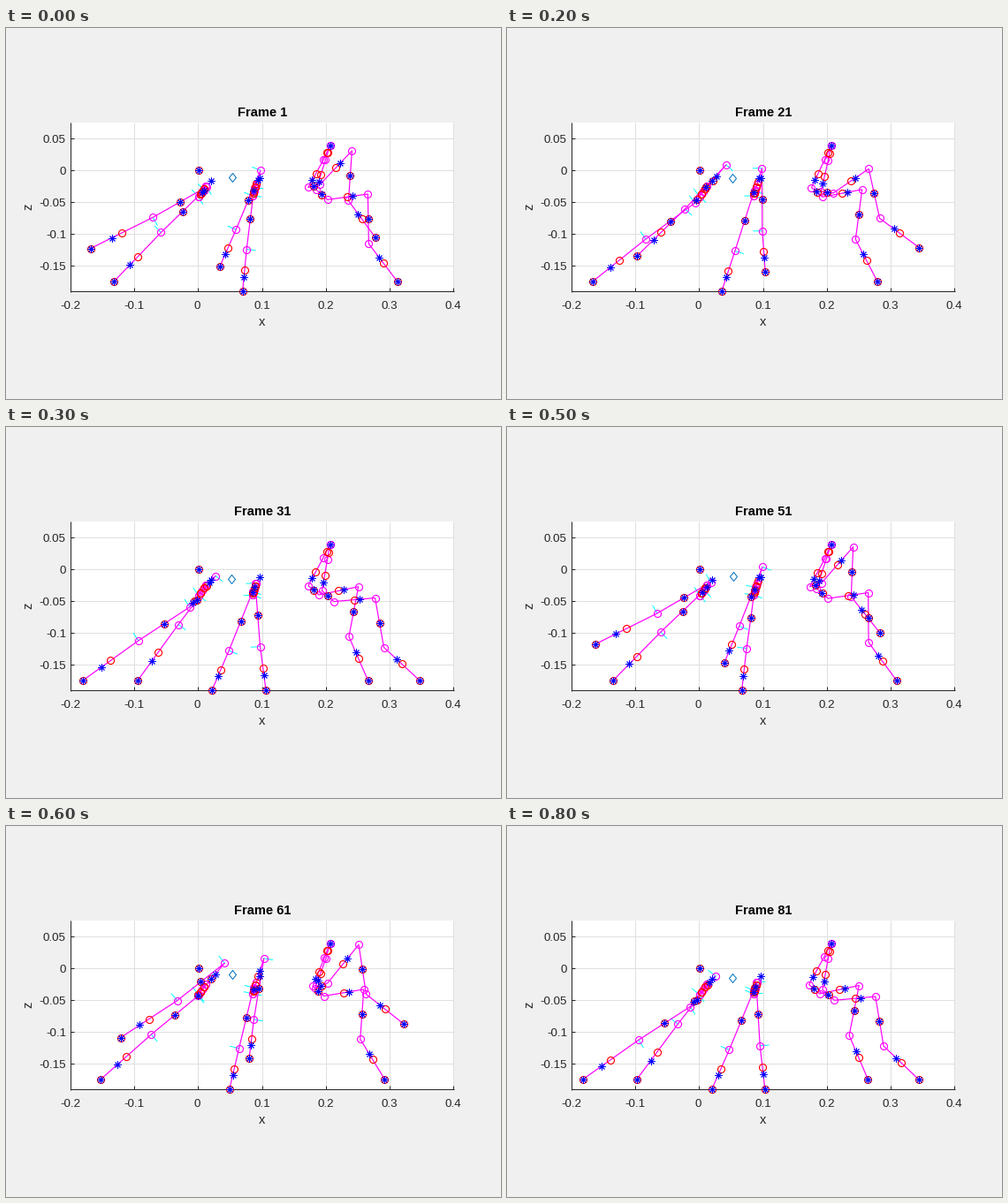
Write a matplotlib script that moves like this. It is 560x420 px and loops after 0.9 s.

```python
import numpy as np
import matplotlib.pyplot as plt
from matplotlib.animation import FuncAnimation
from matplotlib.patches import Rectangle

W, H, DPI = 560, 420, 100
PX = 72 / DPI
SWING, STANCE = 4.3, 5.4          # durations in animation steps
CYCLE = SWING + STANCE
START = 1.3                       # the first leg is already in the air
ORIGIN = (217.5, 160.5)
BASES = [(231.5, 173), (286.5, 170), (366.5, 133)]

# Moving joints: place at the rear end of the stride, shift over a full
# stride, shift at the full height of the swing.
REAR = [((206, 206), (31, -37.5), (20, -25)),
        ((147, 243), (48, -19.5), (13, -32.5)),
        ((83, 287), (66, 0), (0, -49))]
MIDDLE = [((279, 186.5), (3, -10), (11, -30.5)),
          ((250, 253.5), (37.5, -5), (4, -32)),
          ((229.5, 297.5), (64.5, 0), (0, -36))]
FRONT = [((358.5, 148.2), (5, 2), (0, 0)),
         ((341, 179.3), (16.5, 6), (-3, 0)),
         ((353, 189.6), (18, 8), (-2, -18)),
         ((397.5, 180), (20, 13.5), (-13, -57)),
         ((385.5, 236.5), (42, 13), (-8, -57)),
         ((406, 287), (62, 0), (0, -65))]


def gait(time):
    """Stride position (0 back, 1 front) and foot height (0 to 1)."""
    t = (time + START) % CYCLE
    if t < SWING:
        t /= SWING
        reach = np.clip((t - .08) / .77, 0, 1)
        return .5 - .5 * np.cos(np.pi * reach), np.sin(np.pi * t) ** 1.3
    return (1 - (t - SWING) / STANCE) ** 1.25, 0


def leg_points(root, joints, time):
    stride, lift = gait(time)
    place = np.array(joints)
    return np.vstack([root, place[:, 0] + stride * place[:, 1]
                      + lift * place[:, 2]])


def along(pts, fractions):
    f = np.array(fractions)[:, None]
    return pts[:-1] * (1 - f) + pts[1:] * f


def joint_axes(pts, side):
    """Short lines across the thigh, separated by gaps."""
    d = pts[4] - pts[3]
    normal = side * 10 * np.array([d[1], -d[0]]) / np.hypot(*d)
    out = []
    for p in pts[2:5]:
        out += [p, p + normal, (np.nan, np.nan)]
    return out


plt.rcParams["font.family"] = "Liberation Sans"
fig = plt.figure(figsize=(W / DPI, H / DPI), dpi=DPI, facecolor="#f0f0f0")
ax = fig.add_axes([0, 0, 1, 1])
ax.set_xlim(0, W)
ax.set_ylim(H, 0)
ax.axis("off")

DARK, GRID = "#262626", "#dfdfdf"
LEFT, RIGHT, TOP, BOTTOM = 73, 506, 107, 298
ax.add_patch(Rectangle((LEFT, TOP), RIGHT - LEFT + 1, BOTTOM - TOP,
                       fc="white", lw=0))


def rule(xs, ys, color):
    ax.plot(xs, ys, color=color, lw=PX, snap=True, solid_capstyle="butt",
            zorder=1.5 if color == DARK else 1)


def label(x, y, text, size=13.33, color=DARK, ha="center", **kw):
    kw.setdefault("va", "baseline")
    return ax.text(x, y, text, size=size * PX, color=color, ha=ha, **kw)


for k in range(7):
    x = round(LEFT + k * (RIGHT - LEFT) / 6)
    rule([x, x], [TOP, BOTTOM], GRID)
    rule([x, x], [BOTTOM - 4, BOTTOM], DARK)
    label(x - .5, 318, f"{(k - 2) / 10:g}")
for k in range(5):
    y = 124.7 + 36.17 * k
    rule([LEFT, RIGHT], [round(y)] * 2, GRID)
    rule([LEFT, LEFT + 4], [round(y)] * 2, DARK)
    label(68, y + 5, f"{(1 - k) / 20:g}", ha="right")
rule([LEFT, RIGHT + 1], [BOTTOM] * 2, DARK)
rule([LEFT, LEFT], [TOP, BOTTOM + 1], DARK)

label(289.5, 337, "x", 14.67)
label(25, 202, "z", 14.67, rotation=90, va="center")
title = label(290, 100.5, "", 14.67, "black", weight="bold")

ring = dict(marker="o", ms=8 * PX, mfc="none", mew=1.15 * PX)
axes_line, = ax.plot([], [], color="cyan", lw=PX, zorder=3)
legs = [ax.plot([], [], color="magenta", lw=1.2 * PX, markevery=slice(0, -1),
                zorder=4, **ring)[0] for _ in range(6)]
reds, = ax.plot([], [], ls="", color="red", zorder=5, **ring)
stars, = ax.plot([], [], ls="", color="blue", marker=(8, 2, 0), ms=8 * PX,
                 mew=.95 * PX, zorder=6)
kite = [(0, 1), (.8, 0), (0, -1), (-.8, 0), (0, 1)]
center, = ax.plot([], [], ls="", marker=kite, ms=10 * PX, mfc="none",
                  mec="#0072bd", mew=PX, zorder=7)

# Fixed root joints, moving joints, mass centres on the outer links
LIMBS = [(np.linspace((225.5, 179), (217.5, 190.5), 3), REAR,
          [.64, .5, .66]),
         (np.linspace((283, 177), (279, 190), 3), MIDDLE, [.64, .5, .66]),
         (BASES[2:], FRONT, [.74, .46, .63, .5, .36])]


def put(artist, pts):
    artist.set_data(*np.array(pts).T)


def draw(step):
    title.set_text(f"Frame {10 * step + 1}")
    red, star, cyan = [ORIGIN], [ORIGIN, *BASES], []
    lines = iter(legs)
    for n in range(2):
        for k, (root, joints, mass) in enumerate(LIMBS):
            pts = leg_points(root, joints, step + n * CYCLE / 2)
            put(next(lines), pts)
            red += [*along(pts, [.5] * (len(pts) - 1)), pts[-1]]
            star += [*along(pts[-len(mass) - 1:], mass), pts[-1]]
            if k < 2:
                cyan += joint_axes(pts, (-1) ** (n + k))
    put(axes_line, cyan)
    put(reds, red)
    put(stars, star)
    bob = np.cos(4 * np.pi * (step - .9) / CYCLE)
    put(center, [(255.4 + .6 * bob, 170.2 - 2.1 * bob)])
    return [title, axes_line, *legs, reds, stars, center]


anim = FuncAnimation(fig, draw, frames=9, interval=100, repeat=True,
                     repeat_delay=0, blit=False)
plt.show()
```
